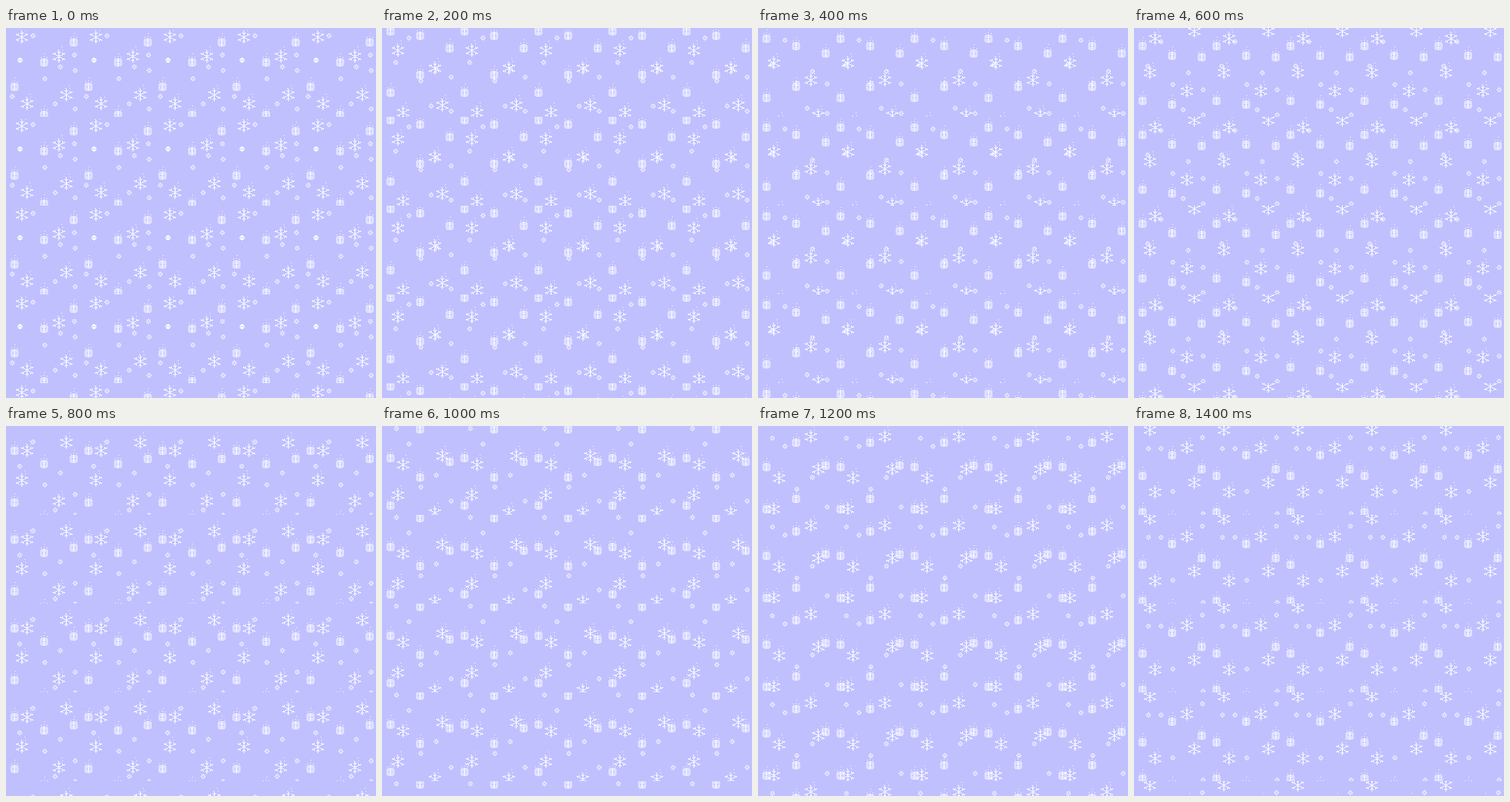
Animation of 500 by 500 pixels, one loop 1600 ms. Source, as an HTML page with a canvas:

```html
<!DOCTYPE html>
<html>
<head>
<meta charset="utf-8">
<style>
html, body { margin: 0; width: 100%; height: 100%; overflow: hidden; background: #c0c0ff; }
canvas { display: block; }
</style>
</head>
<body>
<canvas id="stage" width="500" height="500"></canvas>
<script>
const W = 100, H = 120, STEP = 200, STEPS = 8, DRIFT = 2.8;
const ctx = document.getElementById('stage').getContext('2d');

// Pixels of a symmetric flake, plus loose dots trailing above it.
// The rule receives the distances from the centre along each axis.
function shape(r, rule, trail = []) {
  const dots = [...trail];
  for (let y = -r; y <= r; y++)
    for (let x = -r; x <= r; x++)
      if (rule(Math.abs(x), Math.abs(y))) dots.push([x, y]);
  return dots;
}

// Six arms with side twigs
const big = shape(8, (a, b) =>
  a === 0 || (a < 9 && b === Math.round(a * 0.55)) ||
  (a === 5 && b > 2 && b < 6) || (b === 3 && a > 4 && a < 8) ||
  (a < 3 && b === a + 4),
  [[-1, -9], [5, -9], [4, -13]]);

// Spokes inside a dotted ring
const medium = shape(5, (a, b) => {
  const d = a * a + b * b;
  return d < 36 && (a === 0 || a === b || ((a + b) % 2 === 0 && d > 9));
}, [[-4, -7], [4, -7], [0, -8], [1, -12]]);

const small = shape(3, (a, b) =>
  (a === b && a > 0 && a < 3) || (a * b === 0 && a + b > 1));

// Falling flakes: shape, column, then key points as step, height
const fallers = [
  [big, 21, 7, 5, 8, 12, 10, 47, 12, 73, 14, 112],
  [big, 71, 6, 14, 7, 29, 8, 38, 13, 117],
  [big, 81, 3, 4, 7, 76, 10, 118],
  [big, 28, 3, 14, 7, 89, 10, 127],
  [medium, 91, 0, 19, 2, 34, 7, 58],
  [medium, 51, 5, 4, 7, 39, 8, 46, 10, 79, 12, 126],
  [medium, 51, 1, 10, 4, 51, 5, 69, 7, 126, 8, 117],
  [medium, 11, 1, 4, 5, 43, 8, 79, 10, 94, 15, 116],
  [small, 93, 0, 57, 4, 92, 7, 118],
  [small, 92, 6, -6, 8, 36],
  [small, 19, 5, 3, 8, 43]
];

// Slow flakes: column, first height, number of steps
const drifters = [
  [36, 10, 8], [73, 52, 7], [52, 68, 8],
  [66, 102, 5], [93, 109, 6], [18, 43, 5], [8, 92, 1]
];

const tiles = Array.from({ length: STEPS }, () => {
  const tile = document.createElement('canvas');
  tile.width = W;
  tile.height = H;
  const g = tile.getContext('2d');
  g.fillStyle = '#c0c0ff';
  g.fillRect(0, 0, W, H);
  g.fillStyle = '#fff';
  return g;
});

function stamp(step, dots, x, y) {
  for (const [dx, dy] of dots)
    tiles[step % STEPS].fillRect((x + dx + W) % W, Math.round(y) + dy, 1, 1);
}

for (const [dots, x, ...keys] of fallers) {
  for (let i = 0; i + 3 < keys.length; i += 2) {
    const [s0, y0, s1, y1] = keys.slice(i, i + 4);
    for (let s = i ? s0 + 1 : s0; s <= s1; s++)
      stamp(s, dots, x, y0 + (y1 - y0) * (s - s0) / (s1 - s0));
  }
}
for (const [x, y, count] of drifters)
  for (let s = 0; s < count; s++) stamp(s, small, x, y + DRIFT * s);

const patterns = tiles.map(g => ctx.createPattern(g.canvas, 'repeat'));
const start = performance.now();

function draw() {
  const t = Math.max(0, performance.now() - start);
  ctx.fillStyle = patterns[Math.floor(t / STEP) % STEPS];
  ctx.fillRect(0, 0, 500, 500);
  requestAnimationFrame(draw);
}
draw();
</script>
</body>
</html>
```
